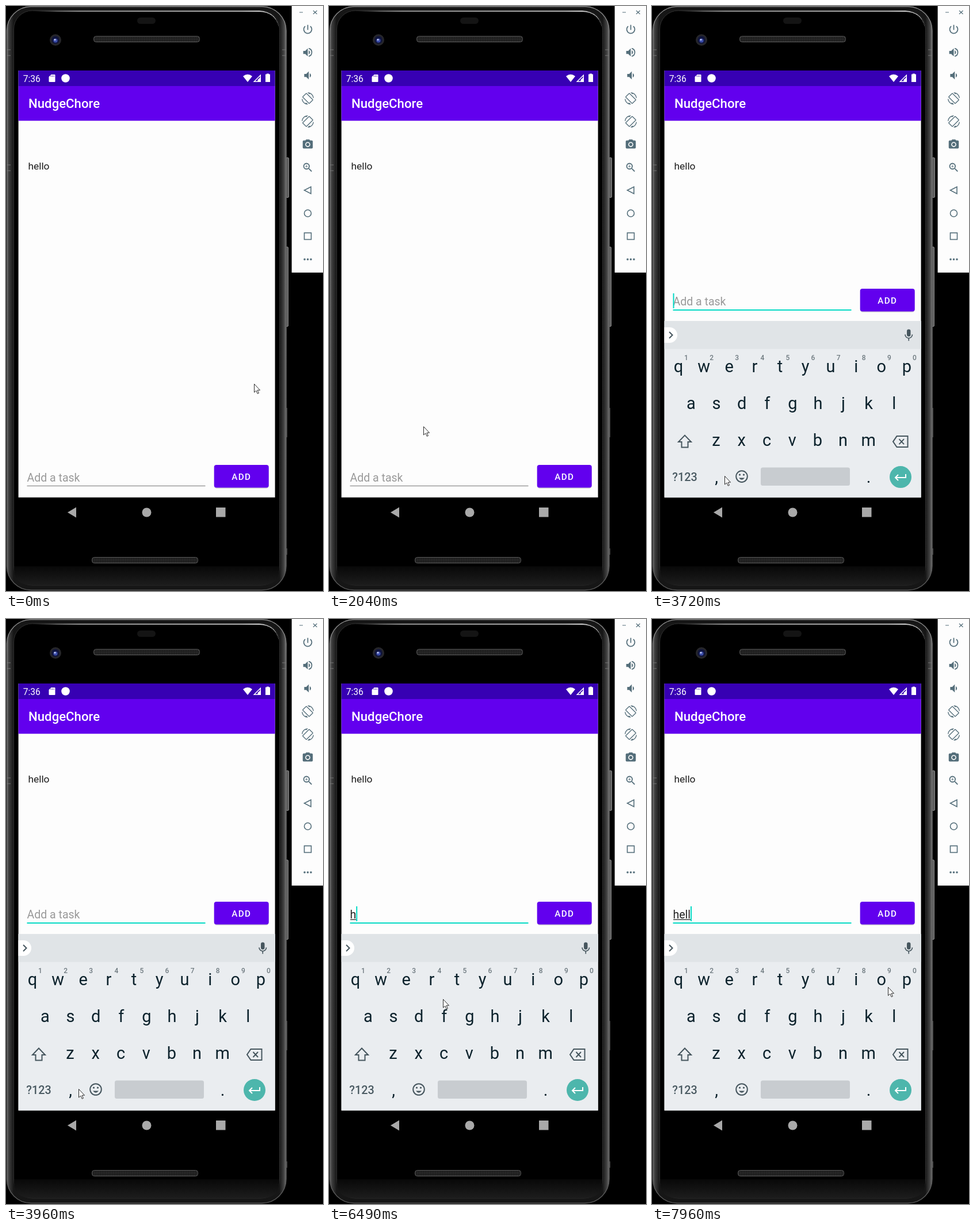
These frames come from a looping animation (551x1016 px, 8000 ms). An HTML page:

```html
<!DOCTYPE html>
<html lang="en">
<head>
<meta charset="utf-8">
<title>Task list demo</title>
<style>
html, body { margin: 0; width: 100%; height: 100%; overflow: hidden; background: #000; }
svg { display: block; width: 100%; height: 100%; font-family: Roboto, sans-serif; }
.line { fill: none; stroke: #546e7a; stroke-width: 1.6; }
.key { font-size: 29px; fill: #0c222c; text-anchor: middle; }
.num { font-size: 12px; font-weight: 500; fill: #6f7a80; text-anchor: middle; }
.kline { fill: none; stroke: #46565e; stroke-width: 2; }
</style>
</head>
<body>
<svg viewBox="0 0 551 1016">
  <defs>
    <linearGradient id="rail">
      <stop offset="0" stop-color="#6a6a6a"/><stop offset=".008" stop-color="#3c3c3c"/>
      <stop offset=".024" stop-color="#161616"/><stop offset=".976" stop-color="#161616"/>
      <stop offset=".992" stop-color="#444"/><stop offset="1" stop-color="#777"/>
    </linearGradient>
    <linearGradient id="edge" x2="0" y2="1">
      <stop offset="0" stop-color="#8c8c8c"/><stop offset=".06" stop-color="#707070"/>
      <stop offset="1" stop-color="#565656"/>
    </linearGradient>
    <linearGradient id="shine">
      <stop offset="0" stop-color="#aaa" stop-opacity="0"/><stop offset=".2" stop-color="#888"/>
      <stop offset=".85" stop-color="#aaa"/><stop offset="1" stop-color="#eee"/>
    </linearGradient>
    <linearGradient id="chin" x2="0" y2="1">
      <stop offset="0" stop-color="#080808"/><stop offset="1" stop-color="#1d1d1d"/>
    </linearGradient>
    <pattern id="mesh" width="3" height="3" patternUnits="userSpaceOnUse">
      <rect width="3" height="3" fill="#1b1b1b"/><rect width="1.5" height="1.5" fill="#3a3a3a"/>
    </pattern>
    <clipPath id="screen"><rect x="21.6" y="112" width="446" height="741.5"/></clipPath>
  </defs>

  <!-- phone body -->
  <rect width="551" height="1016"/>
  <g fill="#5d5d5d" stroke="#8a8a8a">
    <rect x="486.5" y="263.5" width="5" height="69" rx="1.5"/>
    <rect x="485.5" y="418.5" width="5" height="138" rx="1.5"/>
  </g>
  <path d="M488 698V749M488 942V953" stroke="#444" stroke-width="2"/>
  <rect x="1.5" y="1" width="485.5" height="1013.5" rx="42" fill="url(#rail)" stroke="url(#edge)" stroke-width="1.5"/>
  <rect x="13.5" y="8" width="462" height="998" rx="32" fill="#000" stroke="#303030"/>
  <path d="M14 973H475V978Q475 1006 443 1006H46Q14 1006 14 978Z" fill="url(#chin)"/>
  <path d="M40 8.6Q60 8 90 8H440Q472 10 475 42L474 36Q468 10.5 440 10H90Q60 10 40 8.6Z" fill="url(#shine)"/>
  <path d="M1 76H8M1 86H8M1 276H8M1 286H8M480 76H487M480 86H487" stroke="#777"/>
  <rect x="228" y="20" width="32" height="11" rx="5.5" fill="#141414"/>
  <g fill="url(#mesh)" stroke="#5a5a5a">
    <rect x="152.5" y="52.5" width="184" height="10" rx="4"/>
    <rect x="149.5" y="957.5" width="184" height="10" rx="4"/>
  </g>
  <circle cx="86" cy="59" r="10" fill="#26262a"/>
  <circle cx="86" cy="59" r="6.8" fill="#10153c"/>
  <circle cx="86" cy="60" r="3.6" fill="#3d4eaa"/>
  <circle cx="85" cy="58.5" r="1.6" fill="#c3ccf4"/>

  <g fill="#a9a9a9">
    <path d="M107 879.5L122 870.5V888.5Z"/><circle cx="244.5" cy="879.5" r="8"/>
    <rect x="365" y="871" width="16.5" height="16.5"/>
  </g>

  <!-- app -->
  <g clip-path="url(#screen)">
    <rect x="21" y="112" width="447" height="742" fill="#fdfdfd"/>
    <rect x="21" y="139" width="447" height="60.3" fill="#6200ee"/>
    <rect x="21" y="112" width="447" height="27" fill="#3700b3"/>
    <g fill="#fff">
      <text x="29.7" y="131.5" font-size="15.6">7:36</text>
      <path d="M78.5 119H84.5Q85.5 119 85.5 120V131Q85.5 132 84.5 132H75.5Q74.5 132 74.5 131V123Z"/>
      <circle cx="103.5" cy="125.5" r="7.3"/>
      <path d="M420 132L412 122Q420 115.5 428 122Z"/>
      <path d="M443 118.5V132H429.5ZM441.5 122V124.5L437.5 128V130.5H433Z" fill-rule="evenodd"/>
      <path d="M453 118.5V117.5H457V118.5H459V132H451V118.5Z"/>
      <text x="39" y="177" font-size="22.2" font-weight="500">NudgeChore</text>
    </g>
    <path d="M78 120.5V123M80.5 120.5V123M83 120.5V123" stroke="#3700b3" stroke-width=".8"/>
    <text x="38.4" y="284" font-size="17.36" fill="#1c1c1c">hello</text>

    <g id="form">
      <text id="hint" x="36.5" y="825.5" font-size="19.5" fill="#999">Add a task</text>
      <text id="typed" x="36.5" y="825.5" font-size="19.5" fill="#222"></text>
      <path id="compose" stroke="#222" stroke-width="1.3"/>
      <rect id="rule" x="36.5" y="833" width="310"/>
      <rect id="caret" y="805" width="2" height="26" fill="#03dac5"/>
      <rect x="362" y="798" width="94.5" height="40" rx="4.5" fill="#000" opacity=".16"/>
      <rect x="361.7" y="797" width="95" height="39.4" rx="4" fill="#6200ee"/>
      <text x="392.3" y="822.5" font-size="15.2" font-weight="500" letter-spacing="1.36" fill="#fff">ADD</text>
    </g>

    <g id="board">
      <rect x="21" y="547" width="447" height="307" fill="#eaedf0"/>
      <rect x="21" y="547" width="447" height="48.5" fill="#e0e4e7"/>
      <path d="M21 558H30.5A13.5 13.5 0 0 1 30.5 585H21Z" fill="#fff"/>
      <path d="M30 566L35.5 571.5L30 577" class="kline"/>
      <rect x="443" y="561.5" width="6.5" height="12.5" rx="3.25" fill="#46565e"/>
      <path d="M440 570.5A6.25 6.25 0 0 0 452.5 570.5M446.25 577V581.5" class="kline" style="stroke-width:1.7"/>
      <g id="keys"></g>
      <path d="M57 745.5L68 757H62.5V766.5H51.5V757H46Z" class="kline"/>
      <path d="M425.5 747H444.5V766H425.5L419 756.5ZM429.5 752L438 761M438 752L429.5 761" class="kline"/>
      <text x="57" y="825" font-size="19.8" font-weight="500" fill="#4a5a62" text-anchor="middle">?123</text>
      <text x="112" y="828" class="key">,</text>
      <text x="376.5" y="828" class="key">.</text>
      <circle cx="156" cy="817" r="9.8" class="kline"/>
      <path d="M151 819.5Q156 826 161 819.5Z" fill="#46565e"/>
      <circle cx="152.5" cy="814" r="1.6" fill="#46565e"/><circle cx="159.5" cy="814" r="1.6" fill="#46565e"/>
      <rect x="189" y="801.5" width="155" height="31.5" rx="3.5" fill="#c8ccd0"/>
      <circle cx="432" cy="818" r="19" fill="#4db6ac"/>
      <path d="M441 813V819H423.5M428 814L423 819L428 824" fill="none" stroke="#fff" stroke-width="2"/>
      <g id="pop">
        <rect x="-22" y="-93" width="45" height="121" rx="6" fill="#000" opacity=".14"/>
        <rect x="-22" y="-94" width="44" height="121" rx="6" fill="#fafbfc"/>
        <text id="popkey" y="-46" class="key" style="font-size:38px"></text>
      </g>
    </g>
  </g>

  <!-- side toolbar -->
  <rect x="496.6" width="55" height="463" fill="#fdfdfd"/>
  <g id="tools" fill="#546e7a"></g>
  <g class="line">
    <path d="M510 11H516M534 8L540.5 14M540.5 8L534 14" stroke-width="1.2"/>
    <path d="M518.5 320L530 314V326Z"/>
    <circle cx="524.5" cy="360" r="6"/>
    <rect x="518.5" y="394" width="12" height="11.5"/>
  </g>
  <g fill="#546e7a">
    <circle cx="519" cy="440" r="1.8"/><circle cx="524.5" cy="440" r="1.8"/><circle cx="530" cy="440" r="1.8"/>
  </g>

  <path id="mouse" d="M.5 .5V15L3.8 12L6.2 17.3L8.4 16.3L6 11.2H10.5Z" fill="#fff" stroke="#2a2a2a" stroke-linejoin="round"/>
</svg>
<script>
const $ = id => document.getElementById(id);
const LOOP = 8000, PITCH = 44.1, RISE = 306;

// bursts of screen updates: first, last, count
const bursts = [
  [120, 1080, 8], [1210, 2190, 8], [2340, 2460, 2], [2960, 2960, 1], [3330, 4260, 8],
  [4380, 4500, 2], [4810, 4960, 2], [5330, 6340, 9], [6490, 7450, 8], [7570, 7960, 4]
];

// pointer waypoints: time, x, y
const route = [
  [0, 431, 656], [330, 461, 676], [530, 430, 655], [810, 362, 618], [1080, 329, 528],
  [1210, 322, 530], [1500, 262, 595], [1800, 190, 690], [2050, 132, 780], [2190, 124, 813],
  [3330, 124, 813], [3600, 126, 816], [4000, 126, 816], [4260, 113, 644], [4500, 91, 631],
  [4960, 90, 630], [5329, 90, 630], [5330, 101, 634], [5700, 190, 668], [6090, 284, 697],
  [6340, 288, 694], [6490, 198, 660], [6760, 135, 632], [6910, 134, 632], [7180, 290, 668],
  [7450, 411, 694], [7700, 412, 694], [7960, 410, 639]
];

// typed letters: time, letter, key x, key y, popup length
const strokes = [
  [6340, 'h', 288.5, 690, 150], [6901, 'e', 134, 627, 130],
  [7570, 'l', 421, 690, 125], [7700, 'l', 421, 690, 125]
];
const advance = { h: 10.7, e: 10.3, l: 4.75 };

const rows = [['qwertyuiop', 46, 636], ['asdfghjkl', 68, 699.5], ['zxcvbnm', 111.5, 763.5]];
$('keys').innerHTML = rows.map(([letters, x, y], r) => [...letters].map((c, i) => {
  const cx = x + i * PITCH;
  const digit = r ? '' : `<text class="num" x="${cx + 13.5}" y="615">${(i + 1) % 10}</text>`;
  return `<text class="key" x="${cx}" y="${y}">${c}</text>${digit}`;
}).join('')).join('');

// toolbar icons on a 24 unit grid, one every 40 px
const rotate = 'M10.23 1.75c-.59-.59-1.54-.59-2.12 0L1.75 8.11c-.59.59-.59 1.54 0 2.12l12.02 12.02c.59.59 1.54.59 2.12 0l6.36-6.36c.59-.59.59-1.54 0-2.12zm4.6 19.44L2.81 9.17l6.36-6.36 12.02 12.02zM16.48 2.52c3.27 1.55 5.61 4.72 5.97 8.48h1.5C23.44 4.84 18.29 0 12 0l-.66.03 3.81 3.81zM7.52 21.48C4.25 19.94 1.91 16.76 1.55 13H.05C.56 19.16 5.71 24 12 24l.66-.03-3.81-3.81z';
const icons = [
  'M11 3h2v10h-2zM17.83 5.17l-1.42 1.42A7 7 0 1 1 7.58 6.58L6.17 5.17A9 9 0 1 0 17.83 5.17z',
  'M3 9v6h4l5 5V4L7 9zM16.5 12c0-1.77-1.02-3.29-2.5-4.03v8.05c1.48-.73 2.5-2.25 2.5-4.02zM14 3.23v2.06a7 7 0 0 1 0 13.42v2.06a9 9 0 0 0 0-17.54z',
  'M5 9v6h4l5 5V4L9 9zM18.5 12c0-1.77-1.02-3.29-2.5-4.03v8.05c1.48-.73 2.5-2.25 2.5-4.02z',
  rotate, rotate,
  'M9 2L7.17 4H4a2 2 0 0 0-2 2v12a2 2 0 0 0 2 2h16a2 2 0 0 0 2-2V6a2 2 0 0 0-2-2h-3.17L15 2zM12 7a5 5 0 0 1 0 10a5 5 0 0 1 0-10zM12 8.8a3.2 3.2 0 0 0 0 6.4a3.2 3.2 0 0 0 0-6.4z',
  'M15.5 14h-.79l-.28-.27A6.5 6.5 0 1 0 13.73 14.43l.27.28v.79l5 4.99L20.49 19zM9.5 14a4.5 4.5 0 1 1 0-9a4.5 4.5 0 0 1 0 9zM12 10h-2v2H9v-2H7V9h2V7h1v2h2z'
];
$('tools').innerHTML = icons.map((d, i) =>
  `<path fill-rule="evenodd" d="${d}" transform="translate(524.5 ${40.5 + i * 40}) scale(${i === 4 ? -0.875 : 0.875} .875) translate(-12 -12)"/>`
).join('');

const move = (id, x, y) => $(id).setAttribute('transform', `translate(${x} ${y})`);
const show = (id, on) => $(id).setAttribute('visibility', on ? 'inherit' : 'hidden');
const set = (id, attrs) => { for (const k in attrs) $(id).setAttribute(k, attrs[k]); };

function lastUpdate(t) {
  let held = 0;
  for (const [a, b, n] of bursts) {
    if (t < a) break;
    const step = n > 1 ? (b - a) / (n - 1) : 1;
    held = a + step * Math.min(n - 1, Math.floor((t - a) / step + 0.01));
  }
  return held;
}

function pointer(t) {
  const i = route.findIndex(p => p[0] > t);
  if (i < 0) return route[route.length - 1].slice(1);
  const [t0, x0, y0] = route[i - 1], [t1, x1, y1] = route[i];
  const k = (t - t0) / (t1 - t0);
  return [x0 + (x1 - x0) * k, y0 + (y1 - y0) * k];
}

function draw(now) {
  const t = lastUpdate(now);
  const [x, y] = pointer(t);
  move('mouse', Math.round(x), Math.round(y));

  const open = t >= 3330;
  const left = 1 - Math.min(1, Math.max(0, (t - 3330) / 270));
  move('form', 0, open ? -RISE : 0);
  move('board', 0, RISE * left * left);
  show('board', open);

  set('rule', t >= 2340 ? { height: 2, fill: '#03dac5' } : { height: 1, fill: '#777' });

  const done = strokes.filter(s => t >= s[0] - 1);
  const word = done.map(s => s[1]).join('');
  const end = 36.5 + done.reduce((w, s) => w + advance[s[1]], 0);
  const latest = done[done.length - 1];
  show('hint', !word);
  $('typed').textContent = word;
  set('compose', { d: word ? `M37 828H${end}` : '' });

  // the caret blinks on its own clock, restarted by each key
  const since = now - (latest ? latest[0] : 2460);
  show('caret', t >= 2460 && Math.floor(since / 500) % 2 === 0);
  set('caret', { x: end });

  const popped = latest && since < latest[4] - 5;
  show('pop', open && popped);
  if (popped) {
    move('pop', latest[2], latest[3]);
    $('popkey').textContent = latest[1];
  }
}

const start = performance.now();
function tick() {
  draw((performance.now() - start) % LOOP);
  requestAnimationFrame(tick);
}
tick();
</script>
</body>
</html>
```
